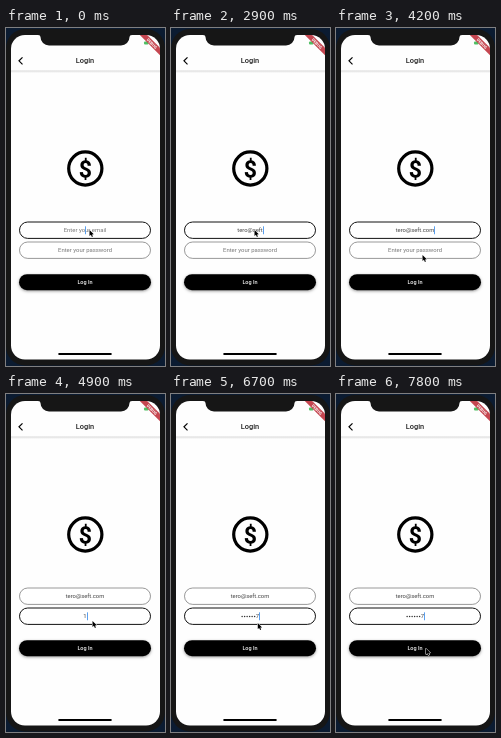
Recreate the animation shown at these times as an HTML page with a canvas. Size 159 by 338 pixels, loop 8 s.

```html
<!DOCTYPE html>
<html lang="en">
<head>
<meta charset="utf-8">
<title>Login</title>
<style>
  html, body { margin: 0; width: 100%; height: 100%; overflow: hidden; background: #000; }
  canvas { display: block; width: 159px; height: 338px; }
</style>
</head>
<body>
<canvas id="stage"></canvas>
<script>
const W = 159, H = 338, LOOP = 8000, MID = 79;
const FONT = 'Roboto, Inter, sans-serif';
const CASE = '#161616', PAGE = '#fefefe';
const canvas = document.getElementById('stage');
const ctx = canvas.getContext('2d');
const scale = window.devicePixelRatio || 1;
canvas.width = W * scale;
canvas.height = H * scale;

const EMAIL = 'tero@seft.com';
// [time, number of characters, extra mistyped text]
const emailKeys = [[0, 0], [100, 1], [200, 2], [300, 3], [400, 4], [950, 5], [1200, 6], [1300, 7],
  [1400, 8], [1600, 9], [2200, 9, 'c'], [2900, 9], [3000, 10], [3200, 11], [3300, 12], [3500, 13]];
const passKeys = [[0, 0], [4800, 1], [5100, 2], [5400, 3], [5600, 4], [5900, 5], [6100, 6], [6300, 7]];
const mouseKeys = [[0, 83.5, 202], [3700, 83.5, 202], [4150, 86.5, 227], [6600, 86.5, 227], [7200, 90, 254.5]];

const latest = (keys, t) => keys.filter(k => k[0] <= t).pop();
const clamp = v => Math.max(0, Math.min(1, v));
const smooth = v => v * v * (3 - 2 * v);

function box(x, y, w, h, r) {
  ctx.beginPath();
  ctx.roundRect(x, y, w, h, r);
}

function fillBox(x, y, w, h, r, color) {
  box(x, y, w, h, r);
  ctx.fillStyle = color;
  ctx.fill();
}

function text(str, x, y, size, color, weight = 400, align = 'center') {
  ctx.font = `${weight} ${size}px ${FONT}`;
  ctx.textAlign = align;
  ctx.fillStyle = color;
  ctx.fillText(str, x, y);
  return ctx.measureText(str).width;
}

const screen = () => box(5, 7, 149, 324.5, 14);

function drawCase() {
  ctx.fillStyle = '#0b1b31';
  ctx.fillRect(0, 0, W, H);
  fillBox(0, 1, 159, 336.5, 19, CASE);
  screen();
  ctx.fillStyle = PAGE;
  ctx.fill();
}

function drawBanner() {
  ctx.save();
  screen();
  ctx.clip();
  fillBox(138, 13.5, 4.5, 3, 1, '#4fbf63');
  ctx.translate(146, 15.5);
  ctx.rotate(Math.PI / 4);
  ctx.fillStyle = '#c54650';
  ctx.fillRect(-18, -2.6, 36, 5.2);
  text('DEBUG', 0, 1.5, 4, '#fff', 700);
  ctx.restore();
}

function drawNotch() {
  ctx.beginPath();
  ctx.moveTo(32, 6);
  ctx.lineTo(32, 7);
  ctx.quadraticCurveTo(34.5, 7, 34.5, 9);
  ctx.arcTo(34.5, 17.5, 43, 17.5, 8.5);
  ctx.arcTo(123.5, 17.5, 123.5, 9, 8.5);
  ctx.quadraticCurveTo(123.5, 7, 126, 7);
  ctx.lineTo(126, 6);
  ctx.fillStyle = CASE;
  ctx.fill();
}

function drawHeader() {
  const shade = ctx.createLinearGradient(0, 42.5, 0, 45);
  shade.addColorStop(0, '#d9d9d9');
  shade.addColorStop(1, PAGE);
  ctx.fillStyle = shade;
  ctx.fillRect(5, 42.5, 149, 2.5);
  drawBanner();
  drawNotch();
  ctx.beginPath();
  ctx.moveTo(16.5, 29.3);
  ctx.lineTo(13, 32.8);
  ctx.lineTo(16.5, 36.3);
  ctx.strokeStyle = '#000';
  ctx.lineWidth = 1.2;
  ctx.stroke();
  text('Login', MID, 35.3, 7.4, '#222', 500);
}

function drawCoin() {
  ctx.beginPath();
  ctx.arc(79.3, 140.5, 16.6, 0, 7);
  ctx.strokeStyle = '#000';
  ctx.lineWidth = 3.2;
  ctx.stroke();
  text('$', 79.3, 148.7, 23, '#000', 700);
}

function drawField(y, focused) {
  box(13.5, y - 8.2, 131, 16.4, 8.2);
  ctx.fillStyle = '#fff';
  ctx.fill();
  ctx.strokeStyle = focused ? '#111' : '#555';
  ctx.lineWidth = focused ? 1 : 0.6;
  ctx.stroke();
}

function caret(x, y) {
  fillBox(Math.round(x), y - 4, 1, 8, 0.3, '#5a9fee');
}

function drawEmail(t, focused) {
  const y = 202.2;
  drawField(y, focused);
  const [, count, typo = ''] = latest(emailKeys, t);
  let end = MID;
  if (count) {
    end += text(EMAIL.slice(0, count) + typo, MID, y + 2, 5.85, '#444') / 2;
  } else {
    text('Enter your email', MID, y + 2, 5.95, '#777');
  }
  if (focused) caret(end, y);
}

function drawPassword(t, focused) {
  const y = 222.2, pitch = 2.5, digit = 3.3;
  drawField(y, focused);
  const count = latest(passKeys, t)[1];
  let end = MID;
  if (count) {
    const width = (count - 1) * pitch + digit;
    const left = MID - width / 2;
    ctx.fillStyle = '#333';
    for (let i = 0; i < count - 1; i++) {
      ctx.beginPath();
      ctx.arc(left + (i + 0.5) * pitch, y + 0.2, 0.75, 0, 7);
      ctx.fill();
    }
    text(count, left + width - digit, y + 2, 5.85, '#444', 400, 'left');
    end = left + width;
  } else {
    text('Enter your password', MID, y + 2, 5.95, '#777');
  }
  const blinkOff = t >= 7200 && t < 7700;
  if (focused && !blinkOff) caret(end, y);
}

function drawButton(t) {
  ctx.save();
  ctx.shadowColor = 'rgba(0,0,0,.4)';
  ctx.shadowBlur = 3 * scale;
  ctx.shadowOffsetY = scale;
  fillBox(13, 246.2, 132, 16, 8, '#000');
  ctx.restore();
  if (t >= 7400) {
    ctx.save();
    box(13, 246.2, 132, 16, 8);
    ctx.clip();
    ctx.beginPath();
    ctx.arc(90, 254.2, 10 + 70 * clamp((t - 7400) / 400), 0, 7);
    ctx.fillStyle = `rgba(255,255,255,${0.04 * clamp((7800 - t) / 300)})`;
    ctx.fill();
    ctx.restore();
  }
  text('Log In', MID, 256.1, 5.5, '#f4f4f4', 500);
}

function drawMouse(t) {
  const from = latest(mouseKeys, t);
  const to = mouseKeys[mouseKeys.indexOf(from) + 1] || from;
  const p = to === from ? 0 : smooth((t - from[0]) / (to[0] - from[0]));
  ctx.save();
  ctx.translate(from[1] + (to[1] - from[1]) * p, from[2] + (to[2] - from[2]) * p);
  ctx.beginPath();
  [[0, 0], [0, 6], [1.4, 4.8], [2.4, 7], [3.4, 6.5], [2.5, 4.4], [4.3, 4.3]]
    .forEach(([x, y]) => ctx.lineTo(x, y));
  ctx.closePath();
  ctx.lineJoin = 'round';
  ctx.strokeStyle = '#fff';
  ctx.lineWidth = 1;
  ctx.stroke();
  ctx.fillStyle = '#000';
  ctx.fill();
  ctx.restore();
}

function draw(now) {
  const t = now % LOOP;
  const onPassword = t >= 4300;
  ctx.setTransform(scale, 0, 0, scale, 0, 0);
  drawCase();
  drawHeader();
  drawCoin();
  drawEmail(t, !onPassword);
  drawPassword(t, onPassword);
  drawButton(t);
  fillBox(52.2, 325, 53.6, 2, 1, '#000');
  drawMouse(t);
}

const start = performance.now();
function tick() {
  draw(performance.now() - start);
  requestAnimationFrame(tick);
}
tick();
</script>
</body>
</html>
```
